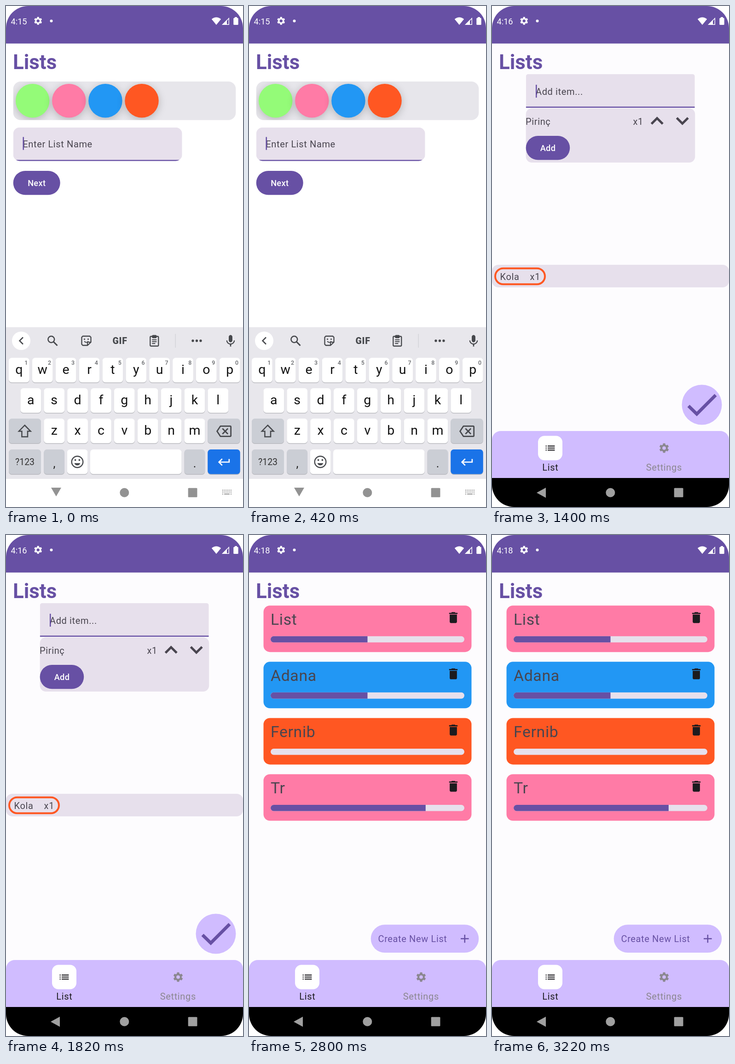
Write an HTML page with a canvas that moves like this. It is 515x1088 px and loops after 3.5 s.

```html
<!DOCTYPE html>
<html lang="en">
<head>
<meta charset="utf-8">
<title>Lists app</title>
<style>
  html, body { margin: 0; width: 100%; height: 100%; overflow: hidden; background: #fff; }
  canvas { display: block; width: 515px; height: 1088px; }
</style>
</head>
<body>
<canvas id="stage" width="515" height="1088"></canvas>
<script>
const W = 515, H = 1088, STEP = 700;
const ctx = document.getElementById('stage').getContext('2d');
const PURPLE = '#6750a4', LAVENDER = '#d0bcff', PANEL = '#e7e0ec', PAGE = '#fdfcfe';
const INK = '#1c1b1f', SOFT = '#49454f', KEY_INK = '#46484c';
const GREEN = '#94fb78', PINK = '#ff7ba6', BLUE = '#2297f4', ORANGE = '#ff5722';
const BODY = 20, TRACK = 0.63;

const ICONS = {
  bin: 'M6 19c0 1.1.9 2 2 2h8c1.1 0 2-.9 2-2V7H6v12zM19 4h-3.5l-1-1h-5l-1 1H5v2h14V4z',
  list: 'M3 13h2v-2H3v2zm0 4h2v-2H3v2zm0-8h2V7H3v2zm4 4h14v-2H7v2zm0 4h14v-2H7v2zM7 7v2h14V7H7z',
  mic: 'M12 14c1.66 0 3-1.34 3-3V5c0-1.66-1.34-3-3-3S9 3.34 9 5v6c0 1.66 1.34 3 3 3zm5.3-3c0 3-2.54 5.1-5.3 5.1S6.7 14 6.7 11H5c0 3.41 2.72 6.23 6 6.72V21h2v-3.28c3.28-.48 6-3.3 6-6.72h-1.7z',
  erase: 'M22 3H7c-.69 0-1.23.35-1.59.88L0 12l5.41 8.11c.36.53.9.89 1.59.89h15c1.1 0 2-.9 2-2V5c0-1.1-.9-2-2-2zm0 16H7.07L2.4 12l4.66-7H22v14zm-11.59-2L14 13.41 17.59 17 19 15.59 15.41 12 19 8.41 17.59 7 14 10.59 10.41 7 9 8.41 12.59 12 9 15.59z',
  enter: 'M19 7v4H5.83l3.58-3.59L8 6l-6 6 6 6 1.41-1.41L5.83 13H21V7z'
};

function rect(x, y, w, h, color) {
  ctx.fillStyle = color;
  ctx.fillRect(x, y, w, h);
}

function box(x, y, w, h, r, color) {
  ctx.beginPath();
  ctx.roundRect(x, y, w, h, r);
  ctx.fillStyle = color;
  ctx.fill();
}

function frame(x, y, w, h, r, color, width) {
  ctx.beginPath();
  ctx.roundRect(x, y, w, h, r);
  ctx.strokeStyle = color;
  ctx.lineWidth = width;
  ctx.stroke();
}

function disc(x, y, r, color) {
  ctx.beginPath();
  ctx.arc(x, y, r, 0, Math.PI * 2);
  ctx.fillStyle = color;
  ctx.fill();
}

function trace(points) {
  ctx.beginPath();
  points.forEach(([x, y]) => ctx.lineTo(x, y));
}

function poly(points, color) {
  trace(points);
  ctx.fillStyle = color;
  ctx.fill();
}

function line(points, color, width, closed) {
  trace(points);
  if (closed) ctx.closePath();
  ctx.strokeStyle = color;
  ctx.lineWidth = width;
  ctx.stroke();
}

function text(str, x, y, { size = BODY, weight = 400, color = SOFT, align = 'left', track = TRACK } = {}) {
  ctx.font = `${weight} ${size}px Roboto, sans-serif`;
  ctx.letterSpacing = track + 'px';
  ctx.textAlign = align;
  ctx.fillStyle = color;
  ctx.fillText(str, x, y);
  return ctx.measureText(str).width;
}

function icon(name, x, y, scale, color, ox = 12, oy = 12) {
  ctx.save();
  ctx.translate(x, y);
  ctx.scale(scale, scale);
  ctx.translate(-ox, -oy);
  ctx.fillStyle = color;
  ctx.fill(new Path2D(ICONS[name]));
  ctx.restore();
}

function gear(x, y, r, color) {
  ctx.beginPath();
  for (let i = 0; i < 6; i++) {
    const mid = -Math.PI / 2 + i * Math.PI / 3;
    for (const [da, k] of [[-0.36, 0.74], [-0.23, 1], [0.23, 1], [0.36, 0.74]]) {
      ctx.lineTo(x + Math.cos(mid + da) * r * k, y + Math.sin(mid + da) * r * k);
    }
  }
  ctx.closePath();
  ctx.moveTo(x + r * 0.36, y);
  ctx.arc(x, y, r * 0.36, 0, Math.PI * 2);
  ctx.fillStyle = color;
  ctx.fill('evenodd');
}

function header(time) {
  rect(0, 0, W, 81.5, PURPLE);
  text(time, 10.5, 39.5, { size: 18.2, color: '#fff', track: 0 });
  gear(69.7, 32.3, 8.8, '#fff');
  disc(98.5, 32.5, 3, '#fff');
  ctx.beginPath();
  ctx.moveTo(457, 41);
  ctx.lineTo(446.8, 28.5);
  ctx.quadraticCurveTo(457, 20.5, 467.2, 28.5);
  ctx.fillStyle = '#fff';
  ctx.fill();
  poly([[469, 41], [480, 30], [480, 41]], '#fff');
  line([[471, 40.2], [484.3, 40.2], [484.3, 26.8]], '#fff', 1.4, true);
  box(494.3, 26, 10.4, 15, 1.5, '#fff');
  rect(497, 24, 5, 3, '#fff');
  text('Lists', 15, 137, { size: 43.8, weight: 700, color: PURPLE, track: 0 });
}

function homeButtons(color) {
  disc(257.3, 1056.7, 10, color);
  box(395.7, 1046.8, 19.8, 20, 1.5, color);
}

function tabs() {
  box(0, 923, W, 102, [19, 19, 0, 0], LAVENDER);
  box(100, 933.5, 53, 53, 14, '#fff');
  icon('list', 126.5, 960, 1.1, INK);
  text('List', 126.8, 1009, { color: INK, align: 'center' });
  gear(374, 960, 10.6, '#8b8790');
  text('Settings', 373.8, 1009, { color: '#8b8790', align: 'center' });
  rect(0, 1025, W, 63, '#000');
  poly([[97, 1057], [117, 1046], [117, 1068]], '#a0a0a0');
  homeButtons('#a0a0a0');
}

function roundScreen() {
  ctx.beginPath();
  ctx.rect(0, 0, W, H);
  ctx.roundRect(0, 0, W, H, 48);
  ctx.fillStyle = '#fff';
  ctx.fill('evenodd');
}

function caret(x, y) {
  rect(x, y, 2.5, 28, PURPLE);
}

function field(x, y, radius) {
  ctx.save();
  ctx.beginPath();
  ctx.roundRect(x, y, 367, 73, radius);
  ctx.clip();
  rect(x, y, 367, 73, PANEL);
  rect(x, y + 70.5, 367, 2.5, PURPLE);
  ctx.restore();
}

function pill(label, x, y, w) {
  box(x, y, w, 52.3, 26, PURPLE);
  text(label, x + w / 2, y + 33, { size: 18.2, weight: 500, color: '#fff', align: 'center', track: 0.3 });
}

function palette(color) {
  ctx.save();
  ctx.beginPath();
  ctx.roundRect(15.7, 164, 483.6, 83.7, 16);
  ctx.clip();
  rect(15, 163, 486, 86, color);
  ctx.shadowColor = 'rgba(0,0,0,.22)';
  ctx.shadowBlur = 18;
  ctx.shadowOffsetY = 4;
  [GREEN, PINK, BLUE, ORANGE].forEach((c, i) => disc(57.7 + i * 79.1, 205.7, 36.8, c));
  ctx.restore();
}

function nameForm(rowColor) {
  palette(rowColor);
  field(15.7, 263.7, 14);
  pill('Next', 15.7, 358, 102);
}

function key(x, y, w, label, color = '#fff') {
  box(x, y + 1.5, w, 53.5, 6.5, '#b9babf');
  box(x, y, w, 53.5, 6.5, color);
  if (label) text(label, x + w / 2, y + 35, { size: 28.5, color: '#111', align: 'center', track: 0 });
}

function keyboardTools() {
  disc(33, 727, 20, '#fff');
  line([[37, 719.5], [29.5, 727], [37, 734.5]], KEY_INK, 2.5);
  ctx.beginPath();
  ctx.arc(98.3, 724, 6.9, 0, Math.PI * 2);
  ctx.stroke();
  line([[103, 729], [111.5, 737.5]], KEY_INK, 3);
  line([[167, 717], [182, 717], [184.5, 719.5], [184.5, 730], [177, 737], [167, 737], [164.5, 734.5], [164.5, 719.5]], KEY_INK, 2.3, true);
  line([[184, 730], [177, 730], [177, 737]], KEY_INK, 2);
  disc(170.5, 723.5, 1.6, KEY_INK);
  disc(178.5, 723.5, 1.6, KEY_INK);
  ctx.beginPath();
  ctx.arc(174.5, 726, 4.5, 0.4, 2.7);
  ctx.stroke();
  text('GIF', 231.5, 733.5, { size: 19.5, weight: 900, color: KEY_INK, track: 0.8 });
  frame(313.3, 717.5, 18, 21, 2, KEY_INK, 2.3);
  box(317.3, 714.5, 10, 7, 2, KEY_INK);
  [[724, 10], [728, 10], [732, 7]].forEach(([y, w]) => rect(317.3, y, w, 2, KEY_INK));
  rect(367.5, 712, 1.3, 30, '#cfd0d5');
  [406, 414.5, 423].forEach(x => disc(x, 727, 2.7, KEY_INK));
  icon('mic', 488, 727, 1.32, KEY_INK, 12, 11.5);
}

function keyboard() {
  const grey = '#cbced5', pitch = 50.87, w = 44.8;
  rect(0, 697.5, W, 329.5, '#e8e7ec');
  keyboardTools();
  [...'qwertyuiop'].forEach((c, i) => {
    const x = 6 + i * pitch;
    key(x, 764, w, c);
    text(String((i + 1) % 10), x + 37.8, 778.5, { size: 12.5, weight: 500, color: '#66686c', align: 'center', track: 0 });
  });
  [...'asdfghjkl'].forEach((c, i) => key(31.4 + i * pitch, 830, w, c));
  [...'zxcvbnm'].forEach((c, i) => key(6 + (i + 1.5) * pitch, 896, w, c));
  key(6, 896, 70, '', grey);
  line([[40.7, 910.5], [53.5, 923.5], [47, 923.5], [47, 935.5], [34.4, 935.5], [34.4, 923.5], [28, 923.5]], KEY_INK, 2.5, true);
  key(438.3, 896, 70.4, '', grey);
  icon('erase', 473.5, 923.5, 1.38, KEY_INK);

  const y = 963;
  key(6, y, 70, '', grey);
  text('?123', 41, 997, { size: 19.5, color: '#333', align: 'center', track: 0 });
  key(82.3, y, w, '', grey);
  text(',', 105, 1002, { size: 25, color: '#222', align: 'center', track: 0 });
  key(132.8, y, w, '');
  ctx.beginPath();
  ctx.arc(155, 990, 12.3, 0, Math.PI * 2);
  ctx.strokeStyle = KEY_INK;
  ctx.lineWidth = 2.4;
  ctx.stroke();
  disc(150.6, 986, 1.9, KEY_INK);
  disc(159.4, 986, 1.9, KEY_INK);
  ctx.beginPath();
  ctx.arc(155, 991, 6.6, 0.25, Math.PI - 0.25);
  ctx.fill();
  key(183, y, 198.6, '');
  key(387.5, y, w, '', grey);
  text('.', 410, 1002, { size: 25, color: '#222', align: 'center', track: 0 });
  key(438.3, y, 70.4, '', '#1a73e8');
  icon('enter', 473.5, 990.5, 1.34, '#fff', 11.5);
}

function keyboardNav() {
  const grey = '#929292';
  poly([[98, 1046], [120, 1046], [109, 1065]], grey);
  homeButtons(grey);
  for (let i = 0; i < 6; i++) {
    rect(470 + i * 3.6, 1050.5, 2, 2, grey);
    rect(470 + i * 3.6, 1054.5, 2, 2, grey);
  }
  rect(470, 1058.8, 2, 2, grey);
  rect(474, 1058.8, 12, 2, grey);
  rect(488, 1058.8, 2, 2, grey);
}

function chip(name, x, w) {
  frame(x + 2, 569.7, w - 4, 34.6, 17.3, ORANGE, 4);
  text(name, x + 12.5, 595);
  text('x1', x + w - 12, 595, { align: 'right' });
}

function itemsPage(time, chips) {
  rect(0, 0, W, H, PAGE);
  header(time);
  field(73.7, 148, [5, 5, 0, 0]);
  text('Add item...', 95, 193);
  box(0, 562, W, 49, 14, PANEL);
  chips.forEach(c => chip(...c));
  disc(456, 866, 43.5, LAVENDER);
  line([[427, 868.5], [445, 886], [486, 845]], PURPLE, 7);
  tabs();
}

function card(title, color, done, i) {
  const y = 153.2 + i * 122.1;
  box(31.5, y, 452, 101, 14, color);
  text(title, 47, y + 41.5, { size: 33.8 });
  icon('bin', 444, y + 26.2, 1.31, INK);
  ctx.save();
  ctx.beginPath();
  ctx.roundRect(47, y + 66.5, 421, 13.6, 6.8);
  ctx.clip();
  rect(47, y + 66, 421, 15, PANEL);
  rect(47, y + 66, 421 * done, 15, PURPLE);
  ctx.restore();
}

const scenes = [
  () => {
    rect(0, 0, W, H, '#fff');
    header('4:15');
    nameForm('#e7e6eb');
    text('Enter List Name', 36.3, 307);
    caret(36.5, 284.5);
    keyboard();
    keyboardNav();
  },
  () => {
    rect(0, 0, W, H, PAGE);
    header('4:16');
    rect(0, 148, W, 877, ORANGE);
    nameForm('#e55f36');
    const typed = text('fernib', 36.3, 307, { color: INK });
    caret(36.3 + typed, 284.5);
    tabs();
  },
  () => {
    itemsPage('4:16', [['Kola', 5, 112]]);
    caret(95, 171);
    box(73.7, 222, 367.5, 118, 13, PANEL);
    text('Pirinç', 73, 258);
    text('x1', 306.5, 258);
    line([[346.5, 256], [358.7, 243.8], [371, 256]], SOFT, 5);
    line([[401.5, 243], [413.7, 255.2], [426, 243]], SOFT, 5);
    pill('Add', 73.7, 282, 95.5);
  },
  () => itemsPage('4:17', [['Kola', 5, 112], ['Pirinç', 127, 125.5]]),
  () => {
    rect(0, 0, W, H, PAGE);
    header('4:18');
    card('List', PINK, 0.5, 0);
    card('Adana', BLUE, 0.5, 1);
    card('Fernib', ORANGE, 0, 2);
    card('Tr', PINK, 0.8, 3);
    box(264.7, 846.3, 234.5, 60.7, 30.3, LAVENDER);
    text('Create New List', 280.5, 884, { color: PURPLE });
    line([[460, 876.7], [477.6, 876.7]], PURPLE, 2.5);
    line([[468.8, 868], [468.8, 885.5]], PURPLE, 2.5);
    tabs();
  }
];

let start;
function tick(now) {
  start ??= now;
  const index = Math.floor((now - start) / STEP) % scenes.length;
  scenes[index]();
  roundScreen();
  requestAnimationFrame(tick);
}
requestAnimationFrame(tick);
</script>
</body>
</html>
```
